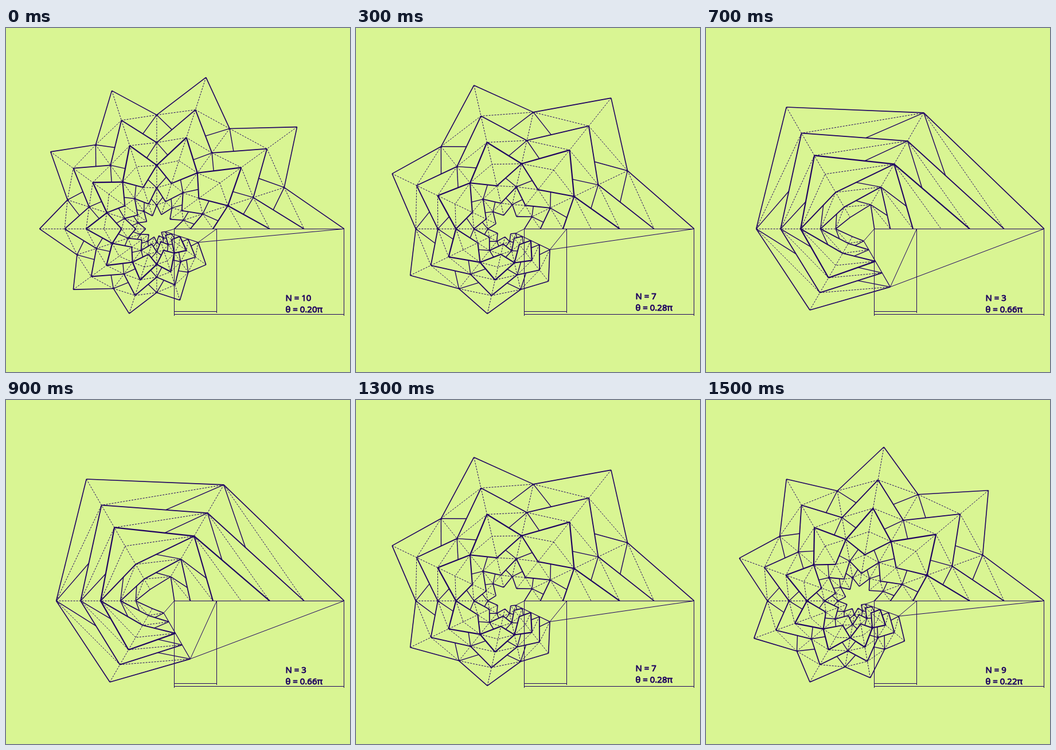
An HTML page with a canvas for the animation above (1.6 s loop, 600 px wide and 600 px high).

```html
<!DOCTYPE html>
<html>
<head>
<meta charset="utf-8">
<style>
  html, body { margin: 0; width: 100%; height: 100%; overflow: hidden; background: #d9f593; }
  canvas { display: block; }
</style>
</head>
<body>
<canvas id="stage" width="600" height="600"></canvas>
<script>
const ctx = document.getElementById('stage').getContext('2d');
const INK = '#1e0060', PAPER = '#d9f593';
const CX = 262.9, CY = 350.4;
const STEP = 100, MAX_N = 10, MIN_N = 2;
const STEPS = 2 * (MAX_N - MIN_N);

// Distances from the centre along the peak rays and the valley rays.
const PEAKS = [327, 257, 197, 147.2, 98.1, 58.6, 30.8];
const VALLEYS = [233.8, 177.1, 130.5, 84.3, 48.8];

// [valley, peak, line width]
const RIDGES = [[0, 0, 1.6], [1, 1, 1.8], [2, 2, 2.2], [2, 4, 2], [3, 5, 1.8], [4, 6, 1.6]];
// [start valley, valley and peak of the ridge it meets, place along that ridge]
const TICKS = [[0, 1, 1, 0.393], [1, 2, 2, 0.37], [3, 2, 4, 0.65], [4, 3, 5, 0.682]];

function polar(radius, angle) {
  return [CX + radius * Math.cos(angle), CY - radius * Math.sin(angle)];
}

function line(a, b, width = 1, dash = []) {
  ctx.lineWidth = width;
  ctx.setLineDash(dash);
  ctx.beginPath();
  ctx.moveTo(...a);
  ctx.lineTo(...b);
  ctx.stroke();
}

const dashed = (a, b) => line(a, b, 1, [3, 2]);
const mix = (a, b, t) => [a[0] + (b[0] - a[0]) * t, a[1] + (b[1] - a[1]) * t];

function halfWedge(valleys, peaks) {
  VALLEYS.forEach((_, i) => dashed(valleys[i], peaks[i + 1]));
  for (const [start, v, p, t] of TICKS) line(valleys[start], mix(valleys[v], peaks[p], t), 1.4);
  for (const [v, p, width] of RIDGES) line(valleys[v], peaks[p], width);
}

function spiral(n) {
  const scale = k => 1 - 0.75 * k / n;
  const peaksAt = k => PEAKS.map(r => polar(r * scale(k), 2 * Math.PI * k / n));
  const valleysAt = k => VALLEYS.map(r => polar(r * scale(k), 2 * Math.PI * (k + 0.5) / n));

  for (let k = 0; k < n; k++) {
    const peaks = peaksAt(k), valleys = valleysAt(k);
    const last = k === n - 1;
    halfWedge(valleys, peaks);
    if (k > 0) dashed(peaks[0], peaks[6]);
    if (last) {
      line(valleys[0], valleys[4], 1.2);
      line(valleys[0], [589.5, CY]);
      line(valleys[0], [367.5, CY]);
      line(valleys[4], [293.5, CY]);
    } else {
      halfWedge(valleys, peaksAt(k + 1));
      dashed(valleys[0], valleys[4]);
    }
  }
}

function dimensions() {
  line([293.5, 350.5], [589.5, 350.5], 1.2);
  line([293.5, 350], [293.5, 502]);
  line([367.5, 350], [367.5, 497]);
  line([589.5, 350], [589.5, 502]);
  line([293.5, 494.5], [367.5, 494.5]);
  line([293.5, 499.5], [589.5, 499.5]);
}

function label(text, y) {
  ctx.setLineDash([]);
  ctx.lineWidth = 0.9;
  ctx.fillText(text, 487.5, y);
  ctx.strokeText(text, 487.5, y);
}

function draw(n) {
  ctx.fillStyle = PAPER;
  ctx.fillRect(0, 0, 600, 600);
  ctx.fillStyle = ctx.strokeStyle = INK;
  ctx.lineJoin = 'round';
  ctx.font = '15px "Open Sans", "Noto Sans", sans-serif';
  spiral(n);
  dimensions();
  const baseline = n > 3 && n < 9 ? 473 : 476;
  label(`N = ${n}`, baseline);
  label(`θ = ${(Math.floor(200 / n) / 100).toFixed(2)}π`, baseline + 20);
}

const start = performance.now();
function tick() {
  const step = Math.floor((performance.now() - start) / STEP) % STEPS;
  draw(MIN_N + Math.abs(MAX_N - MIN_N - step));
  requestAnimationFrame(tick);
}
tick();
</script>
</body>
</html>
```
